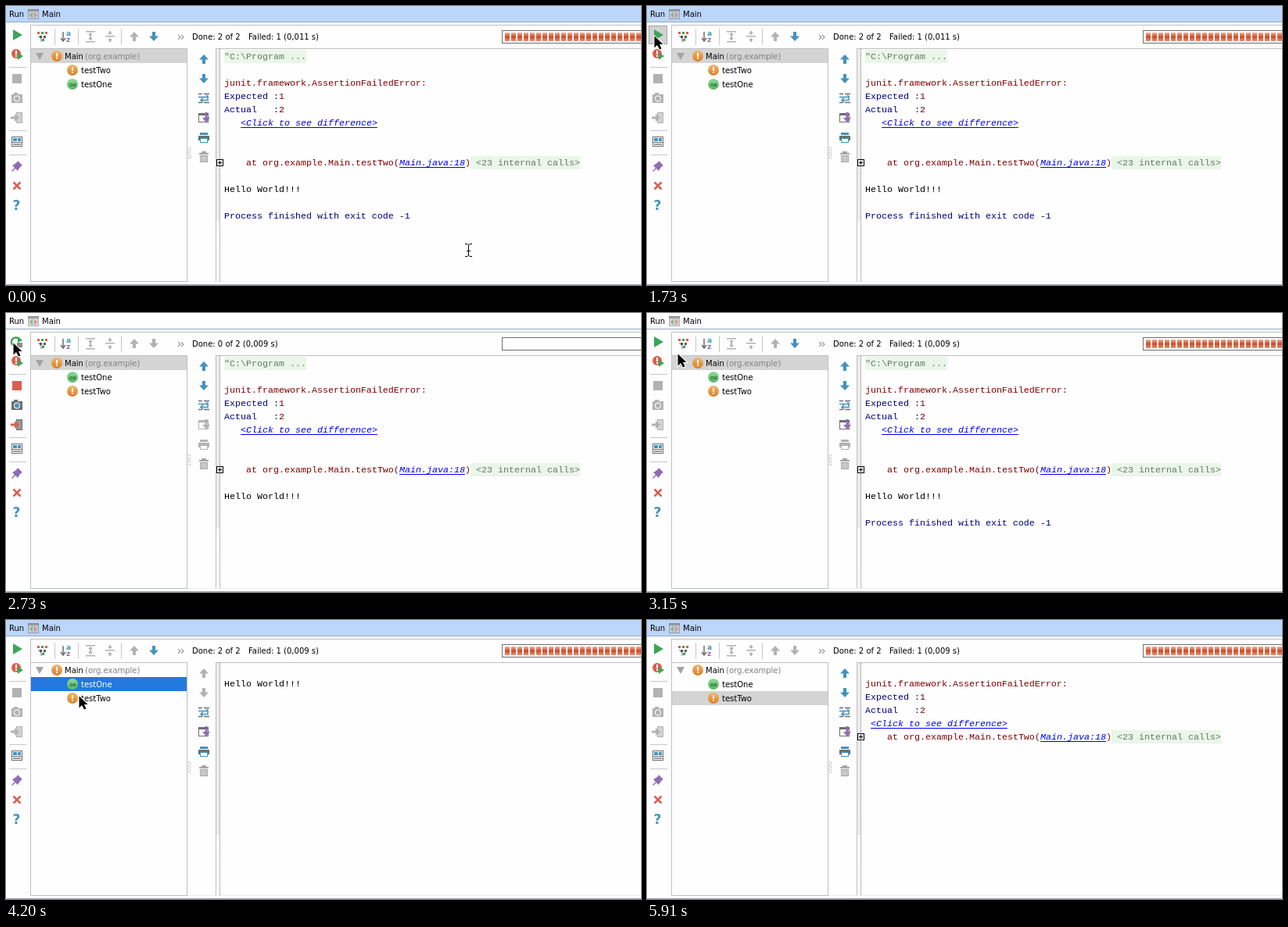
An HTML page with a canvas that plays this animation: 812x357 px, repeating every 6.08 s.

```html
<!DOCTYPE html>
<html lang="en">
<head>
<meta charset="utf-8">
<title>Test runner</title>
<style>
  html, body { margin: 0; width: 100%; height: 100%; overflow: hidden; background: #fefefe; }
  canvas { display: block; }
</style>
</head>
<body>
<canvas width="812" height="357"></canvas>
<script>
const g = document.querySelector('canvas').getContext('2d');
const LOOP = 6080;
const UI = '10px "DejaVu Sans", sans-serif';
const MONO = '11.667px "Liberation Mono", monospace';
const BLUE = '#4193bd', GREY = '#b2b2b2', DARK = '#6e6e6e', RED = '#d9604f',
      GREEN = '#3ba657', PURPLE = '#8f6bb3', LINE = '#bfbfbf';
const ERROR = '#7f0000', SYSTEM = '#00007f', LINK = '#0000ee';

// Drawing helpers
function rect(x, y, w, h, color) {
  g.fillStyle = color;
  g.fillRect(x, y, w, h);
}
function frame(x, y, w, h, color, inside) {
  rect(x, y, w, h, color);
  rect(x + 1, y + 1, w - 2, h - 2, inside);
}
function fill(x, y, path, color) {
  g.save();
  g.translate(x, y);
  g.fillStyle = color;
  g.fill(new Path2D(path));
  g.restore();
}
function stroke(x, y, path, color, width = 1) {
  g.save();
  g.translate(x, y);
  g.strokeStyle = color;
  g.lineWidth = width;
  g.stroke(new Path2D(path));
  g.restore();
}
function disc(x, y, r, color) {
  g.fillStyle = color;
  g.beginPath();
  g.arc(x, y, r, 0, 7);
  g.fill();
}
function text(x, y, string, color = '#000', font = UI) {
  g.font = font;
  g.fillStyle = color;
  g.fillText(string, x, y + 4);
}

// Icons, placed by their centre
function arrow(x, y, dir, on) {
  fill(x, y, dir < 0 ? 'M0-6L6 .5H2V6H-2V.5H-6Z' : 'M0 6L6-.5H2V-6H-2V-.5H-6Z', on ? BLUE : GREY);
}
function badge(x, y, passed) {
  const shade = g.createLinearGradient(0, y - 7, 0, y + 7);
  shade.addColorStop(0, passed ? '#8ddb93' : '#f2b56a');
  shade.addColorStop(1, passed ? '#55b866' : '#d97f23');
  disc(x, y, 7, shade);
  if (passed) {
    text(x - 4, y - 1.5, 'OK', '#2d6b3a', 'bold 5.5px "DejaVu Sans", sans-serif');
  } else {
    rect(x - 1, y - 4, 2, 5, '#fff');
    rect(x - 1, y + 2, 2, 2, '#fff');
  }
}
function leftToolbar(running, starting, hover) {
  if (hover) frame(2, 25, 24, 24, '#a5a5a5', '#d2d2d2');
  if (running) {
    stroke(14, 38, 'M3-4A5.5 5.5 0 1 0-4 4', GREEN, 2.5);
    fill(14, 38, 'M1-8L7-3L1 0Z', GREEN);
    rect(14, 38, 7, 6, '#8c8c8c');
  } else {
    fill(14, 37, 'M-5-7L7 0L-5 7Z', GREEN);
  }
  disc(13, 61, 6, starting ? GREY : RED);
  if (!starting) {
    rect(12, 57, 2, 5, '#fff');
    rect(12, 63, 2, 2, '#fff');
  }
  fill(16, 64, 'M-1-4L6 0L-1 5Z', starting ? '#a5a5a5' : GREEN);

  rect(8, 87, 12, 12, running ? RED : GREY);

  const body = running ? DARK : GREY;
  rect(7, 113, 14, 11, body);
  rect(10, 111, 5, 3, body);
  disc(14, 118.5, 4, '#fefefe');
  disc(14, 118.5, 3, running ? BLUE : GREY);

  frame(13, 136, 8, 14, body, running ? '#999' : '#d2d2d2');
  fill(13, 143, 'M-7-1.5H-2V-5L4 0L-2 5V1.5H-7Z', running ? RED : GREY);

  frame(7, 167, 14, 13, DARK, '#fefefe');
  rect(9, 169, 5, 4, BLUE);
  rect(15, 169, 4, 4, BLUE);
  rect(7, 174, 14, 1, DARK);
  rect(9, 176, 10, 2, '#9a9a9a');

  fill(14, 205, 'M1-7L7-1L5 0L2 4L1 6L-2 3L-6 7L-7 6L-3 2L-6-1L-4-2L0-5Z', PURPLE);
  stroke(14, 230, 'M-4.5-4.5L4.5 4.5M4.5-4.5L-4.5 4.5', RED, 2.5);
  text(8.5, 257, '?', BLUE, 'bold 17px "DejaVu Sans", sans-serif');
  for (const y of [78, 159, 190]) rect(4, y, 22, 1, '#c8c8c8');
}
function topToolbar(nextOn) {
  const dots = [[-6, -5, RED], [-1, -5, GREEN], [4, -5, RED], [-3, 0, '#555'], [2, 0, '#555'], [0, 4, GREEN]];
  for (const [x, y, color] of dots) rect(46 + x, 38 + y, 3, 3, color);
  stroke(46, 39, 'M-5-1L-1 3V7M5-1L2 3', '#777');

  stroke(73, 39, 'M0-6V5M-3 2L0 6L3 2', DARK, 1.5);
  text(77, 34, 'a', BLUE, 'bold 9px "DejaVu Sans", sans-serif');
  text(77, 42, 'z', PURPLE, 'bold 9px "DejaVu Sans", sans-serif');

  for (const x of [108, 133]) {
    rect(x - 6, x < 120 ? 32 : 38, 12, 1.5, GREY);
    if (x < 120) rect(x - 6, 45, 12, 1.5, GREY);
  }
  fill(108, 39, 'M0-5L3-2H1V2H3L0 5L-3 2H-1V-2H-3Z', GREY);
  fill(133, 39, 'M-1-7H1V-5H3L0-2L-3-5H-1ZM-1 7H1V5H3L0 2L-3 5H-1Z', GREY);
  arrow(164, 39, -1, false);
  arrow(189, 39, 1, nextOn);
  stroke(224, 40, 'M-4-3L-1 0L-4 3M0-3L3 0L0 3', DARK);
  for (const x of [62, 92, 147]) rect(x, 29, 1, 21, '#c8c8c8');
}
function consoleToolbar(stackOn, scrollOn, printOn) {
  arrow(253, 68, -1, stackOn);
  arrow(253, 93, 1, stackOn);

  stroke(253, 118, 'M-7-5.5H-2M0-5.5H7M-7 5.5H-2M0 5.5H7', DARK, 1.5);
  stroke(253, 118, 'M-7-1.5H5V2.5H-4M-1-.5L-4 2.5L-1 5M3-4L6-1.5', BLUE, 1.5);

  frame(246, 137, 13, 12, scrollOn ? DARK : GREY, '#fefefe');
  rect(246, 137, 13, 3, scrollOn ? DARK : GREY);
  fill(256, 143, 'M-1.5-7H1.5V0H5L0 6L-5 0H-1.5Z', scrollOn ? PURPLE : GREY);

  const ink = printOn ? DARK : GREY;
  rect(248, 162, 10, 3, printOn ? BLUE : GREY);
  rect(246, 166, 14, 6, ink);
  frame(248, 169, 10, 6, printOn ? BLUE : GREY, '#fefefe');

  rect(247, 188, 12, 2, '#a5a5a5');
  rect(250, 186, 6, 2, '#a5a5a5');
  frame(248, 191, 10, 9, '#a5a5a5', '#dedede');
  for (const x of [250, 252.5, 255]) rect(x, 192, 1, 7, '#a5a5a5');
}

// Window chrome
function chrome(active, running) {
  rect(0, 0, 812, 357, '#fefefe');
  rect(0, 0, 812, 20, active ? '#bcd5fb' : '#fefefe');
  rect(0, 20, 812, 1, '#91a9cd');
  text(4, 10, 'Run');
  text(46, 10, 'Main');
  g.globalAlpha = running ? 1 : .5;
  frame(28, 4, 14, 13, DARK, '#f4f4f4');
  rect(28, 4, 14, 3, DARK);
  fill(35, 11.5, 'M-5 0L-1-4V4Z', GREEN);
  fill(35, 11.5, 'M5 0L1-4V4Z', RED);
  g.globalAlpha = 1;

  rect(31, 24, 781, 1, LINE);
  rect(31, 24, 1, 329, LINE);
  rect(31, 54, 201, 1, LINE);
  rect(231, 54, 1, 299, LINE);
  rect(31, 352, 201, 1, LINE);
  rect(268, 54, 544, 1, LINE);
  rect(268, 54, 1, 299, LINE);
  rect(232, 352, 580, 1, '#ededed');
  rect(0, 356, 812, 1, '#9aa5b5');
  rect(269, 55, 4, 220, '#ececec');
  for (let y = 55; y < 352; y += 2) rect(273, y, 1, 1, '#777');
  for (let y = 181; y < 196; y += 3) {
    rect(233, y, 1, 1, '#999');
    rect(235, y + 1, 1, 1, '#999');
  }
}
function progress(full) {
  frame(634, 31, 190, 17, '#6f6f6f', '#fefefe');
  if (!full) return;
  const shade = g.createLinearGradient(0, 34, 0, 45);
  shade.addColorStop(0, '#eeb39d');
  shade.addColorStop(.5, '#cf4b28');
  shade.addColorStop(1, '#e99378');
  for (let x = 638; x < 812; x += 8) rect(x, 34, 6, 11, shade);
}

// Test tree
function tree(tests, selected, focused) {
  rect(32, 55 + 18 * selected, 199, 18, focused ? '#2479de' : '#d4d4d4');
  fill(43, 64, 'M-5-4H5L0 5Z', '#a3a3a3');
  badge(65, 64, false);
  text(75, 64, 'Main');
  text(101, 64, '(org.example)', '#808080');
  tests.forEach((name, i) => {
    const y = 82 + 18 * i;
    badge(85, y, name === 'testOne');
    text(96, y, name, focused && selected === i + 1 ? '#fff' : '#000');
  });
}
function startingTree(t) {
  stroke(65, 64, 'M-1-5A5 5 0 0 0-3 4M1 5A5 5 0 0 0 3-4', '#c58f45', 2);
  fill(65, 64, 'M-6 5H0V0ZM6-5H0V0Z', '#c58f45');
  text(75, 64, 'Instantiating tests...');
  const turn = Math.floor((Math.min(t, 2550) - 2310) / 60);
  for (let i = 0; i < 8; i++) {
    const a = i * Math.PI / 4, c = Math.cos(a), s = Math.sin(a);
    const tone = 70 + 18 * ((i - turn + 16) % 8);
    stroke(222, 64, `M${2.5 * c} ${2.5 * s}L${5.5 * c} ${5.5 * s}`, `rgb(${tone},${tone},${tone})`, 1.3);
  }
}

// Console text on a grid of 7 x 17 pixels
const col = n => 279 + 7 * n, row = n => 64 + 17 * n;
function print(r, c, string, color = '#000') {
  text(col(c), row(r), string, color, MONO);
}
function link(r, c, string) {
  text(col(c), row(r), string, LINK, 'italic ' + MONO);
  rect(col(c), row(r) + 6, 7 * string.length, 1, LINK);
}
function folded(r, c, string) {
  rect(col(c), row(r) - 8, 7 * string.length, 17, '#e9f6e8');
  print(r, c, string, '#667a66');
}
function failure(r, indent, traceRow) {
  print(r, 0, 'junit.framework.AssertionFailedError:', ERROR);
  print(r + 1, 0, 'Expected :', SYSTEM);
  print(r + 1, 10, '1', ERROR);
  print(r + 2, 0, 'Actual   :', SYSTEM);
  print(r + 2, 10, '2', ERROR);
  link(r + 3, indent, '<Click to see difference>');
  print(traceRow, 4, 'at org.example.Main.testTwo(', ERROR);
  link(traceRow, 32, 'Main.java:18');
  print(traceRow, 44, ')', ERROR);
  folded(traceRow, 45, ' <23 internal calls>');
  const y = row(traceRow);
  frame(269, y - 4, 9, 9, '#000', '#fff');
  rect(271, y, 5, 1, '#000');
  rect(273, y - 2, 1, 5, '#000');
}
function output(phase, finished) {
  if (phase === 'one') {
    if (finished) print(1, 0, 'Hello World!!!');
  } else if (phase === 'two') {
    failure(1, 1, 5);
  } else if (phase !== 'starting') {
    folded(0, 0, '"C:\\Program ...');
    failure(2, 3, 8);
    print(10, 0, 'Hello World!!!');
    if (finished) print(12, 0, 'Process finished with exit code -1', SYSTEM);
  }
}

// Pointer: each leg is start, end, number of steps, target x, target y
const legs = [
  [180, 750, 11, 3, 39], [1610, 1730, 3, 9, 38], [2940, 3420, 10, 94, 77],
  [3600, 3840, 4, 95, 78], [4020, 4280, 6, 92, 104], [4580, 4640, 2, 95, 104],
  [4790, 4850, 2, 92, 103], [5030, 5540, 10, 735, 342]
];
const clicks = [[2190, 2310], [3420, 3540], [4280, 4400]];

function pointerAt(t) {
  let x = 591, y = 312;
  for (const [start, end, steps, toX, toY] of legs) {
    if (t < start) break;
    const step = Math.floor((t - start) / (end - start) * (steps - 1) + 1e-6) + 1;
    const p = Math.min(1, step / steps), ease = p * p * (3 - 2 * p);
    x += (toX - x) * ease;
    y += (toY - y) * ease;
  }
  return [Math.round(x), Math.round(y)];
}
function pointer(t) {
  if (t >= 5540) return;
  const [x, y] = pointerAt(t);
  if (clicks.some(([from, to]) => t >= from && t < to)) {
    stroke(x, y + 1, 'M-10 0A10 10 0 1 1 10 0A10 10 0 1 1-10 0Z', '#111', 1.2);
  }
  if (t >= 990 && t < 1610) {
    const path = 'M-10 0L-5-5V-1H6V-5L11 0L6 5V1H-5V5Z';
    stroke(x + 1, y, path, '#fff', 2);
    fill(x + 1, y, path, '#000');
  } else if (x > 274) {
    stroke(x, y, 'M-4-7.5H-1L.5-6L2-7.5H5M.5-6V7M-4 8.5H-1L.5 7L2 8.5H5M-2 1.5H3', '#000');
  } else {
    const path = 'M0 0V15L3.5 11.5L6.5 17L9 16L6.5 10.5H11Z';
    stroke(x + .5, y + .5, path, '#fff', 2);
    fill(x + .5, y + .5, path, '#000');
  }
}

function phaseAt(t) {
  if (t < 2310) return 'before';
  if (t < 2700) return 'starting';
  if (t < 2790) return 'running';
  if (t < 3480) return 'done';
  return t < 4340 ? 'one' : 'two';
}

function draw(t) {
  const phase = phaseAt(t);
  const before = phase === 'before', starting = phase === 'starting';
  const executing = starting || phase === 'running';
  const seconds = before ? '0,011 s' : '0,009 s';

  chrome(before || t >= 3540, starting);
  leftToolbar(executing, starting, t >= 700 && before);
  topToolbar(!executing && t < 4580);
  consoleToolbar(!starting && (t < 3600 || t >= 4580), phase !== 'running', before || t >= 3600);
  progress(!executing);

  if (starting) {
    text(238, 39, 'Starting...');
    startingTree(t);
  } else {
    if (executing) {
      text(238, 39, `Done: 0 of 2 (${seconds})`);
    } else {
      text(238, 39, 'Done: 2 of 2');
      text(310, 39, `Failed: 1 (${seconds})`);
    }
    const selected = { one: 1, two: 2 }[phase] || 0;
    tree(before ? ['testTwo', 'testOne'] : ['testOne', 'testTwo'], selected, selected > 0 && t < 5910);
  }
  output(phase, before || (phase === 'done' && t >= 2940) || t >= 3540);
  pointer(t);
}

function tick(now) {
  draw(now % LOOP);
  requestAnimationFrame(tick);
}
requestAnimationFrame(tick);
</script>
</body>
</html>
```
